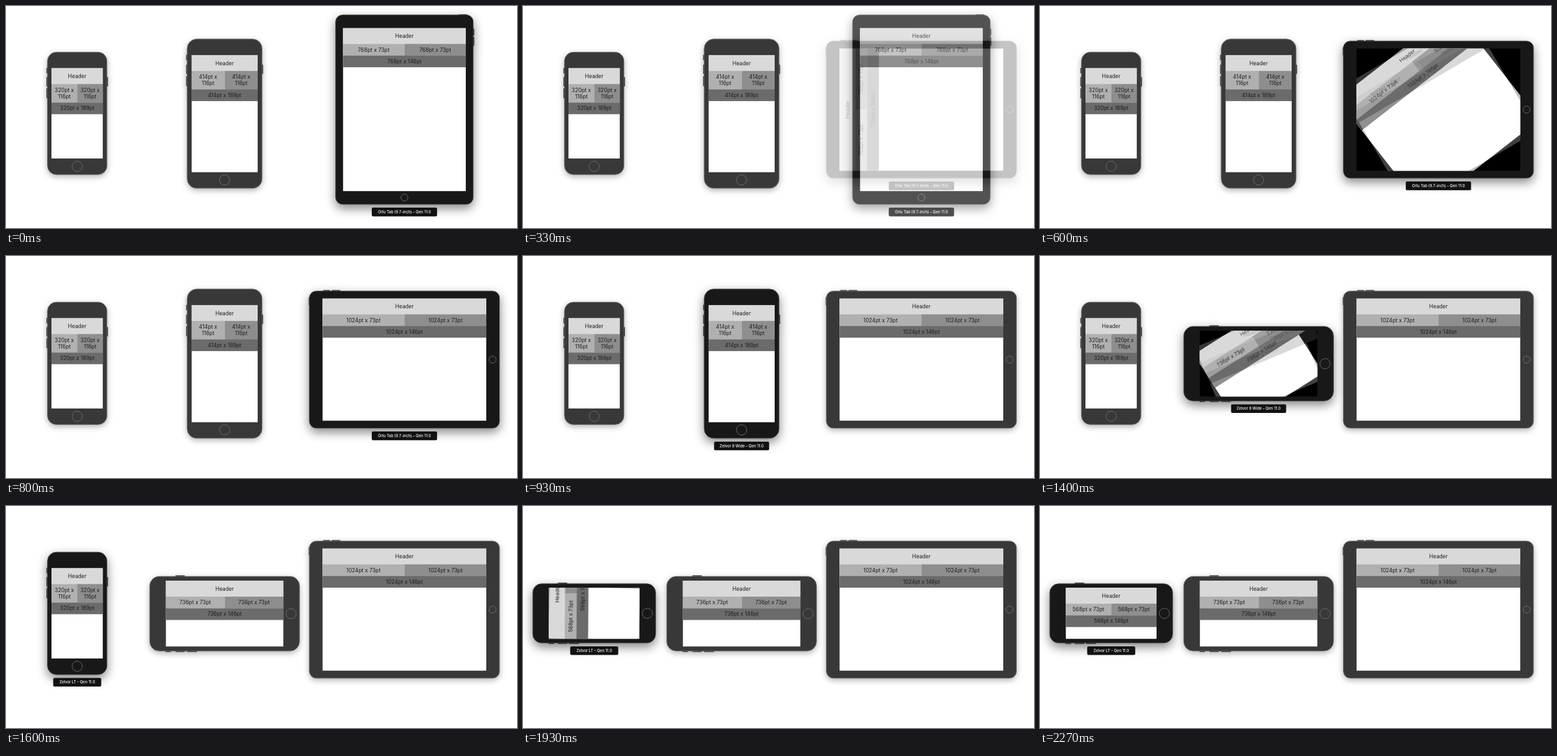
Animation of 798x348 px, one loop 2.93 s. Source, as an HTML page:

```html
<!DOCTYPE html>
<html lang="en">
<head>
<meta charset="utf-8">
<title>Rotating devices</title>
<style>
  html, body { margin: 0; width: 100%; height: 100%; overflow: hidden; background: #fff; }
  svg { display: block; }
  text { font-family: Inter, "Liberation Sans", sans-serif; text-anchor: middle; }
  .cell { font-size: 8.3px; fill: #1e1e1e; }
  .tag { font-size: 5.9px; font-weight: 500; fill: #fff; }
  .idle { filter: drop-shadow(0 3px 5px rgba(0, 0, 0, .3)); }
  .active { filter: drop-shadow(0 6px 8px rgba(0, 0, 0, .48)); }
  .next { opacity: .25; }
</style>
</head>
<body>
<svg id="stage" width="798" height="348" viewBox="0 0 798 348"></svg>
<script>
const LOOP = 2930;
const BLEND = 22; // each picture carries a faint trace of the moment after it
const STEPS = [0, 330, 400, 470, 540, 600, 670, 730, 800, 870, 930,
  1200, 1270, 1330, 1400, 1470, 1530, 1600,
  1870, 1930, 2000, 2070, 2130, 2200, 2270];

// Sizes are for the upright pose; buttons are [x, y, w, h] from the centre.
const phoneButtons = (side, tops) => [
  [-side - 1, tops[0], 3, 9], [-side - 1, tops[1], 3, 15],
  [-side - 1, tops[2], 3, 16], [side - 2, tops[1], 3, 15]
];
const devices = [
  { name: "Zelvor LT – Qen 11.0", tagW: 75, cx: 111.2, cy: 168.3,
    body: [93, 192], screen: [80.4, 142], r: 14, home: [83, 8], split: true,
    pts: [320, 568], buttons: phoneButtons(47, [-71.5, -57, -39.5]),
    on: [1560, LOOP], turn: 1885, start: 1925, dur: 300 },
  { name: "Zelvor 8 Wide – Qen 11.0", tagW: 86, cx: 341.4, cy: 168.8,
    body: [117, 234], screen: [103.5, 184], r: 15, home: [103.8, 8], split: true,
    pts: [414, 736], buttons: phoneButtons(59, [-92.5, -77, -59]),
    on: [880, 1560], turn: 1215, start: 1223, dur: 300 },
  { name: "Orlu Tab (9.7-inch) – Qen 11.0", tagW: 102, cx: 622.2, cy: 162.4,
    body: [215, 297], screen: [192, 256], r: 11, home: [137.7, 5.5], split: false,
    pts: [768, 1024],
    buttons: [[85, -149.5, 13, 3], [106, -127, 3, 11], [106, -114, 3, 14]],
    on: [0, 880], turn: 350, start: 380, dur: 400 }
];

const mix = (a, b, p) => a + (b - a) * p;
const ease = f => (1 - Math.cos(Math.PI * Math.min(1, Math.max(0, f)))) / 2;
const rect = (x, y, w, h, fill, extra = "") =>
  `<rect x="${x}" y="${y}" width="${w}" height="${h}" fill="${fill}" ${extra}/>`;
const label = (x, y, str, cls = "cell") =>
  `<text class="${cls}" x="${x}" y="${y}">${str}</text>`;

function layout(d, wide) {
  const w = d.screen[+wide], pt = d.pts[+wide];
  const tall = d.split && !wide;
  const row = tall ? 29 : 18.3, mid = 25 + row / 2;
  const cell = x => tall
    ? label(x, mid - 2.2, pt + "pt x") + label(x, mid + 8.2, "116pt")
    : label(x, mid + 3, pt + "pt x 73pt");
  return rect(0, 0, w, 25.2, "#d9d9d9") +
    rect(0, 25, w / 2, row + .2, "#b0b0b0") +
    rect(w / 2, 25, w / 2, row + .2, "#8e8e8e") +
    rect(0, 25 + row, w, 18.3, "#6b6b6b") +
    label(w / 2, 15.8, "Header") + cell(w / 4) + cell(w * 3 / 4) +
    label(w / 2, 25 + row + 12.1, `${pt}pt x ${tall ? 189 : 146}pt`);
}

function drawDevice(d, t) {
  const turned = t >= d.turn, active = t >= d.on[0] && t < d.on[1];
  const p = turned ? ease((t - d.start) / d.dur) : 0;
  const [bw, bh] = d.body, [sw, sh] = d.screen;

  const shell = d.buttons.map(b => rect(...b, "#252525", 'rx="1"')).join("") +
    rect(-bw / 2, -bh / 2, bw, bh, active ? "#181818" : "#383838",
      `rx="${d.r}" stroke="${active ? "#555" : "#777"}" stroke-width=".8"`) +
    `<circle cy="${d.home[0]}" r="${d.home[1]}" fill="none" stroke="#777" stroke-width=".8"/>`;

  // The view's bounds grow with the turn while its rows already have their new width.
  const w = mix(sw, sh, p), h = mix(sh, sw, p);
  const angle = turned ? -90 * (1 - p) : 0;
  const [vw, vh] = turned ? [sh, sw] : [sw, sh];
  const view = `<svg x="${-vw / 2}" y="${-vh / 2}" width="${vw}" height="${vh}" overflow="hidden">` +
    rect(0, 0, vw, vh, "#000") +
    `<g transform="translate(${vw / 2} ${vh / 2}) rotate(${angle}) translate(${-w / 2} ${-h / 2})">` +
    rect(0, 0, w, h, "#fff") + layout(d, p > 0) + "</g></svg>";

  const tagY = (turned ? bw : bh) / 2 + 5.2;
  const tag = active
    ? rect(-d.tagW / 2, tagY, d.tagW, 13.6, "#111", 'rx="2"') + label(0, tagY + 9, d.name, "tag")
    : "";

  return `<g transform="translate(${d.cx} ${d.cy})">` +
    `<g class="${active ? "active" : "idle"}"><g transform="rotate(${turned ? -90 : 0})">${shell}</g></g>` +
    view + tag + "</g>";
}

const scene = t => rect(0, 0, 798, 348, "#fff") + devices.map(d => drawDevice(d, t)).join("");

const stage = document.getElementById("stage");
const begin = performance.now();
let shown = -1;

function tick() {
  const t = (performance.now() - begin) % LOOP;
  const step = STEPS.filter(s => s <= t).pop();
  if (step !== shown) {
    shown = step;
    const now = scene(step), next = scene(step + BLEND);
    stage.innerHTML = now + (next === now ? "" : `<g class="next">${next}</g>`);
  }
  requestAnimationFrame(tick);
}
tick();
</script>
</body>
</html>
```
